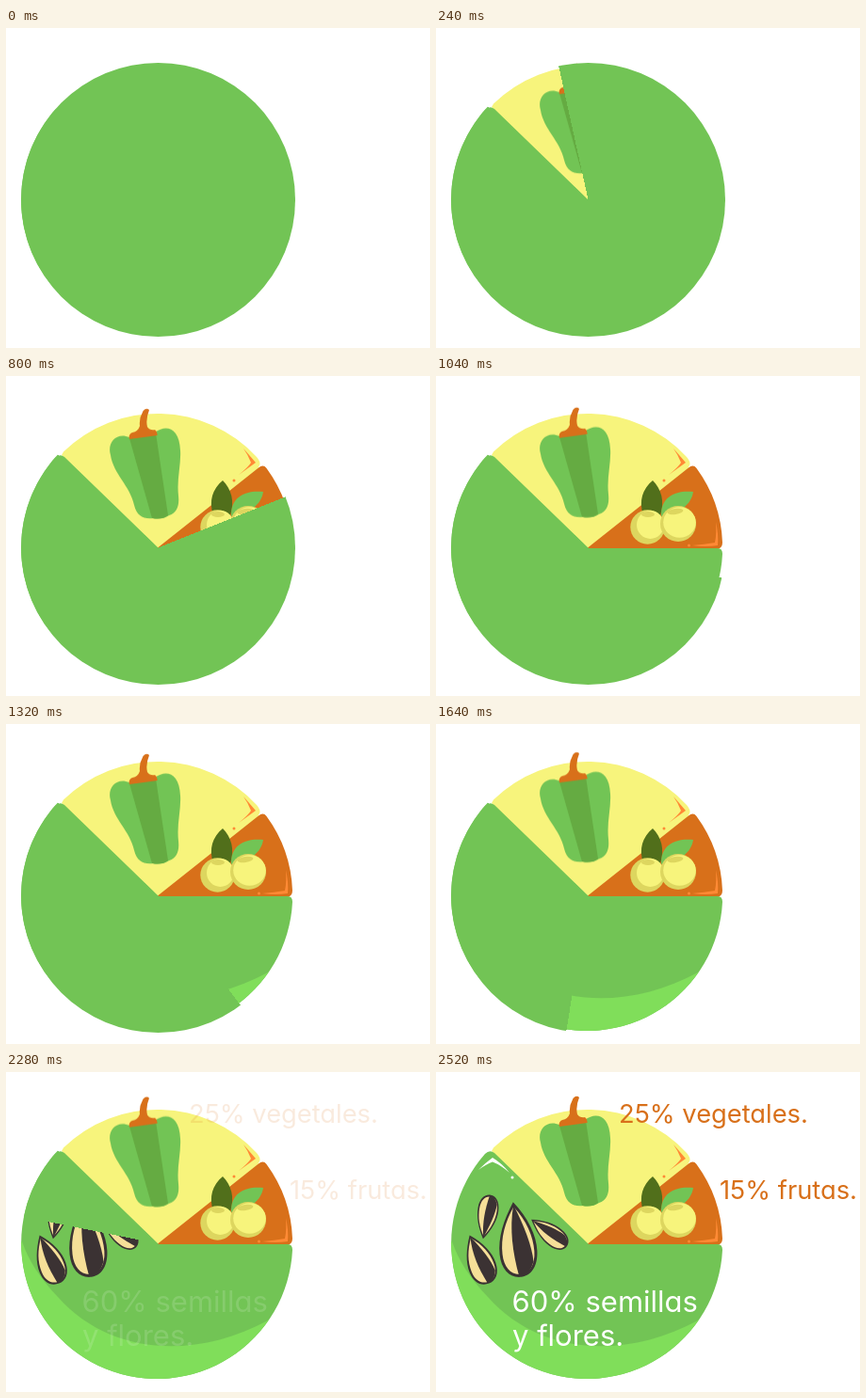
These frames come from a looping animation (450x340 px, 3 s). An HTML page:

```html
<!DOCTYPE html>
<html lang="es">
<head>
<meta charset="utf-8">
<title>Mezcla</title>
<style>
  @property --sweep { syntax: "<angle>"; inherits: false; initial-value: 0deg; }

  html, body { margin: 0; width: 100%; height: 100%; overflow: hidden; background: #fff; }
  svg { position: absolute; left: 0; top: 0; width: 450px; height: 340px; }

  .cover {
    position: absolute; left: 16px; top: 37px; width: 291px; height: 291px;
    border-radius: 50%;
    background: conic-gradient(from -47deg, transparent var(--sweep), #72c455 0);
    animation: wipe 3s infinite;
  }
  .pepper { animation: rise 3s infinite; }
  .labels { animation: show 3s infinite; }

  text { font-family: Inter, "Open Sans", sans-serif; font-feature-settings: "cv11"; }
  .small { font-size: 27.3px; fill: #d8701a; }
  .big { font-size: 31px; fill: #fff; }

  .green { fill: #72c455; }
  .lime { fill: #80de5a; }
  .yellow { fill: #f7f47c; }
  .orange { fill: #d8701a; }
  .shade { fill: #ddd65f; }
  .glow { fill: #ff8a35; }
  .husk { fill: #3b3233; }
  .cream { fill: #f6df98; }

  /* One step every 40 ms */
  @keyframes wipe {
    0% { --sweep: 0deg; animation-timing-function: steps(63); }
    84%, 100% { --sweep: 362.88deg; }
  }
  @keyframes rise {
    0% { transform: translateY(13.6px); animation-timing-function: steps(60); }
    80%, 100% { transform: translateY(0); }
  }
  @keyframes show {
    0% { opacity: 0; }
    74.6667% { opacity: 0; animation-timing-function: steps(7); }
    84%, 100% { opacity: 1; }
  }
</style>
</head>
<body>
<svg viewBox="0 0 450 340">
  <defs>
    <path id="seeds-slice" d="M162 183H299Q304 183 304 189A144 144 0 1 1 52 87Q57 82 62 86Z"/>
    <clipPath id="slice-clip"><use href="#seeds-slice"/></clipPath>
    <g id="seed">
      <path class="husk" d="M0-40C14-22 21-2 20 14C19 32 10 40 0 40C-12 40-20 30-20 14C-20-4-12-22 0-40Z"/>
      <path class="cream" d="M0-35C12-19 17.500-2 17 14C16.500 29 9 37 0 37C-10 37-17 28-17 14C-17-4-11-19 0-35Z"/>
      <path class="husk" d="M0-37C-7-12-6 14-2 38Q9 40 15 25C15 8 9-14 0-37Z"/>
    </g>
  </defs>

  <path class="yellow" d="M162 185L59 84L61 80.500A143 143 0 0 1 266 86Q271 92 269 95L266 101Z"/>
  <path class="orange" d="M161 184V182.500L268 97.500Q273 93.500 276.500 98A143 143 0 0 1 304 177Q304 183 298 184Z"/>
  <use href="#seeds-slice" class="green"/>
  <path class="lime" clip-path="url(#slice-clip)" d="M284 261L278 264C200 306 110 301 55 239Q27 210 17 180H0V340H300V252Z"/>

  <path class="glow" d="M252 77L265 92L247 105Q258 96 260 92Q257 84 252 77Z"/>
  <circle class="glow" cx="242" cy="111" r="1.500"/>
  <path class="glow" d="M297 155Q300 168 299 180Q286 182 272 180Q285 179 296 177Q298 167 297 155Z"/>
  <circle class="glow" cx="268.500" cy="180" r="1.500"/>
  <path fill="#fff" d="M45 104Q53 96 60 91Q70 97 78 107Q69 99 60 95.500Q53 98 45 104Z"/>
  <circle fill="#fff" cx="81" cy="112" r="1.500"/>

  <path fill="#516f1b" d="M230 111C219 120 215 133 220 148H238C243 133 239 120 230 111Z"/>
  <path class="green" d="M273 123C256 121 238 127 239 149C258 146 271 137 273 123Z"/>
  <circle class="shade" cx="224.500" cy="160.500" r="18.200"/>
  <ellipse class="yellow" cx="227.500" cy="158" rx="14.500" ry="15"/>
  <ellipse class="shade" cx="225" cy="147" rx="7" ry="3"/>
  <circle class="shade" cx="257" cy="157" r="19"/>
  <ellipse class="yellow" cx="258.500" cy="155.500" rx="17.300" ry="16.300"/>
  <ellipse class="shade" cx="254" cy="144" rx="8.500" ry="3" transform="rotate(-8 254 144)"/>

  <g class="pepper">
    <path class="green" d="M131 56C117 50 107 62 111 75C114 95 132 108 136 128C139 140 146 143 156 142Q166 144 173 139C182 136 184 128 183 118C181 100 186 85 185 70C184 46 170 42 158 51Z"/>
    <path fill="#65ab42" d="M131 57L159 52L172 139Q165 144 155 142Z"/>
    <path class="orange" d="M145.500 28Q149 24 152 27Q148 37 150 45Q153 49 158 48Q161 50 160.500 54Q146 56 131 58Q129.500 53 134 51Q140 50 142 44Q141 36 145.500 28Z"/>
  </g>

  <use href="#seed" transform="translate(86 178) rotate(-6)"/>
  <use href="#seed" transform="translate(46 199) rotate(-22) scale(.74 .69)"/>
  <use href="#seed" transform="translate(120 171) rotate(-53) scale(.54 .59)"/>
  <use href="#seed" transform="translate(54 154) rotate(190) scale(-.55 .59)"/>
</svg>
<div class="cover"></div>
<svg class="labels" viewBox="0 0 450 340">
  <text class="small" x="194" y="54">25% vegetales.</text>
  <text class="small" x="301" y="135">15% frutas.</text>
  <text class="big" x="80.500" y="255">60% semillas</text>
  <text class="big" x="81" y="291">y flores.</text>
</svg>
</body>
</html>
```
